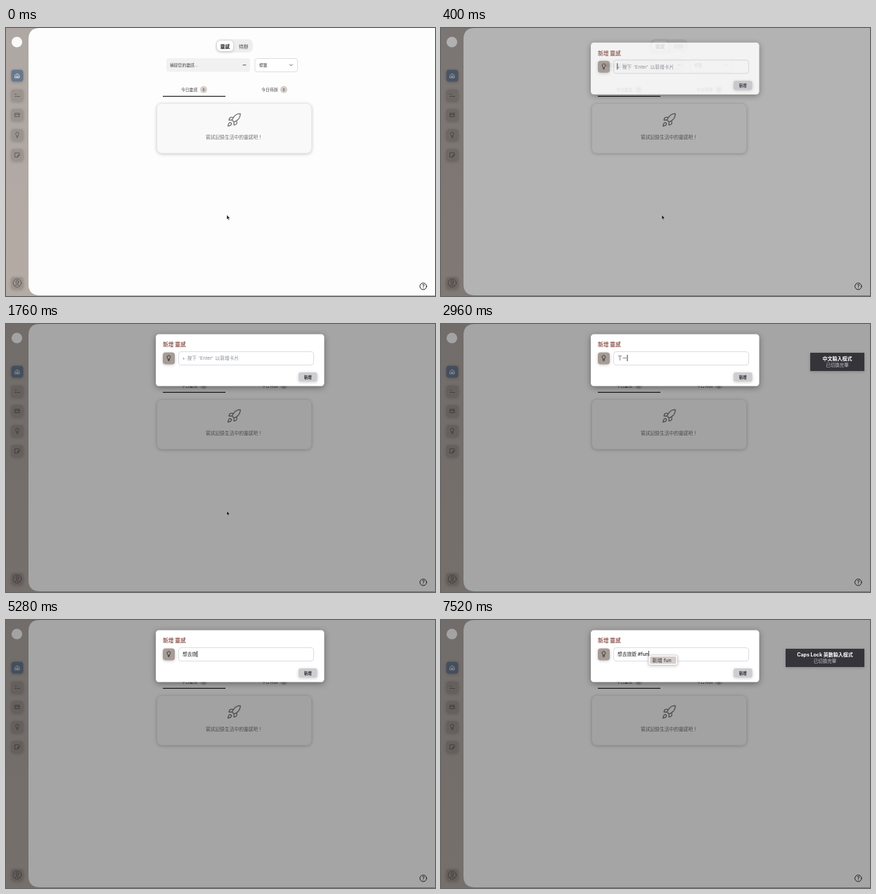
Animation of 610 by 382 pixels, one loop 8 s. Source, as an HTML page:

```html
<!DOCTYPE html>
<html lang="zh-Hant">
<head>
<meta charset="utf-8">
<title>新增靈感</title>
<style>
  html, body { margin: 0; width: 100%; height: 100%; overflow: hidden; background: #b2aaa5; }
  svg { display: block; width: 610px; height: 382px; }
  text { font-family: Inter, "Noto Sans CJK TC", "Noto Sans CJK", sans-serif; white-space: pre; }
  .mid { text-anchor: middle; }
  .line { fill: none; stroke-linecap: round; stroke-linejoin: round; }
  .soft { filter: drop-shadow(0 1px 2px #0003); }
  .deep { filter: drop-shadow(0 2px 4px #0006); }
</style>
</head>
<body>
<svg viewBox="0 0 610 382">
  <defs>
    <linearGradient id="side" x2="0" y2="1">
      <stop stop-color="#aea7a3"/><stop offset="1" stop-color="#b5aba5"/>
    </linearGradient>
  </defs>

  <!-- Sidebar -->
  <rect width="610" height="382" fill="url(#side)"/>
  <circle cx="15.5" cy="20" r="7.6" fill="#fafafa"/>
  <g fill="#9b938e" class="soft">
    <rect x="7.5" y="59.5" width="17" height="17" rx="4" fill="#68788d"/>
    <rect x="7.5" y="87.5" width="17" height="17" rx="4"/>
    <rect x="7.5" y="115.5" width="17" height="17" rx="4"/>
    <rect x="7.5" y="144" width="17" height="17" rx="4"/>
    <rect x="7.5" y="172.5" width="17" height="17" rx="4"/>
    <rect x="7.5" y="355" width="17" height="17" rx="4"/>
  </g>
  <g class="line" stroke="#57504c" stroke-width=".8">
    <path stroke="#eef1f5" d="M13 67.5l3-2.5 3 2.5v3.5h-6zM15 69a1 1 0 0 1 2 0v1h-2z"/>
    <path d="M13 94.5h1.5M13 97.500h1.500M16 97.500h3.500"/>
    <path d="M13 121.500h6v5h-6zM13 123.500h6"/>
    <path d="M15 154.500v-1.500a2.300 2.300 0 1 1 2 0v1.500zM15.200 156.200h1.600"/>
    <path d="M13 178h6v3.500l-2.500 2.500h-3.500zM19 181.500h-2.500v2.500"/>
    <circle cx="16" cy="363.500" r="5.800"/>
    <circle cx="16" cy="362" r="2"/>
    <path d="M12.300 367.500q3.700-4 7.400 0"/>
  </g>

  <!-- Page -->
  <path d="M610 0H48Q32 0 32 16V365Q32 381 48 381H610z" fill="#fdfdfd"/>
  <rect x="298" y="16" width="53" height="19" rx="7" fill="#eee"/>
  <rect x="300" y="18" width="23" height="15" rx="5" fill="#fff" class="soft"/>
  <g font-size="6.7" class="mid">
    <text x="311.500" y="28.500" font-weight="700" fill="#222">靈感</text>
    <text x="337.700" y="28.500" fill="#444">待辦</text>
  </g>
  <rect x="228" y="43" width="119" height="19.500" rx="4" fill="#f1f1f1"/>
  <rect x="354" y="43.500" width="60.500" height="19" rx="3.500" fill="#fff" stroke="#ddd"/>
  <g font-size="5.8" fill="#444">
    <text x="233" y="55">捕捉您的靈感...</text>
    <text x="360" y="55">標籤</text>
    <text x="249" y="90.200" font-weight="500">今日靈感</text>
    <text x="363.300" y="90.200">今日待辦</text>
  </g>
  <path class="line" stroke="#444" stroke-width=".9" d="M337 52.800h4M403.500 52l1.800 1.800 1.800-1.800"/>
  <circle cx="281" cy="87.700" r="5" fill="#d6cdc9"/>
  <circle cx="395" cy="87.700" r="5" fill="#d6cdc9"/>
  <g font-size="5" fill="#333" class="mid">
    <text x="281" y="89.600">0</text><text x="395" y="89.600">0</text>
  </g>
  <rect x="223" y="96.800" width="89" height="1.200" fill="#222"/>
  <rect x="214.500" y="107.500" width="220" height="71" rx="7" fill="#f9f9f9" stroke="#e6e6e6" class="soft"/>
  <path class="line" stroke="#777" stroke-width="1.500" transform="translate(313.400 120.400) scale(.9)"
    d="M4.500 16.500c-1.500 1.260-2 5-2 5s3.740-.5 5-2c.71-.84.7-2.130-.09-2.910a2.180 2.180 0 0 0-2.910-.09zM12 15l-3-3a22 22 0 0 1 2-3.950A12.880 12.880 0 0 1 22 2c0 2.720-.78 7.500-6 11a22.350 22.350 0 0 1-4 2zM9 12H4s.55-3.030 2-4c1.620-1.080 5 0 5 0M12 15v5s3.030-.55 4-2c1.080-1.620 0-5 0-5"/>
  <text x="284" y="157.600" font-size="6.75" font-weight="500" fill="#707070">嘗試記錄生活中的靈感吧！</text>

  <rect id="shade" width="610" height="382" opacity="0"/>

  <circle cx="593.300" cy="368.200" r="4.700" class="line" stroke="#222" stroke-width="1"/>
  <text x="593.300" y="370.800" font-size="7" font-weight="600" fill="#222" class="mid">?</text>

  <!-- Dialog -->
  <g id="dialog" opacity="0">
    <rect x="213" y="14.500" width="239.500" height="74" rx="4.500" fill="#fff" class="deep"/>
    <text x="223" y="32.300" font-size="7.7" font-weight="600" fill="#925f56">新增 靈感</text>
    <rect x="223" y="40.500" width="17" height="17" rx="4" fill="#a69b95" class="soft"/>
    <path class="line" stroke="#222" stroke-width=".9" d="M230.400 50.500v-1.300a2.300 2.300 0 1 1 2 0v1.300zM230.600 52.200h1.600"/>
    <rect x="245.500" y="39.500" width="192" height="19" rx="3.500" fill="#fff" stroke="#dcdde3"/>
    <text id="hint" x="250.500" y="51.400" font-size="6.75" fill="#868b96" word-spacing=".9">+ 按下 'Enter' 以新增卡片</text>
    <text id="typed" x="251" y="51.400" font-size="6.75" font-weight="500" fill="#222"></text>
    <rect id="caret" y="44" width=".9" height="9" fill="#222"/>
    <rect x="416" y="69" width="26.500" height="13" rx="3" fill="#cdcdd2" class="soft"/>
    <text x="429.300" y="77.600" font-size="5.5" font-weight="600" fill="#222" class="mid">新增</text>
  </g>

  <!-- Tag suggestion -->
  <g id="popup">
    <rect id="frame" y="50" height="14.500" rx="3" fill="#fff" stroke="#bbb" stroke-width=".6" class="soft"/>
    <rect id="choice" y="52" height="10.500" rx="2" fill="#d5cecb"/>
    <text id="tag" y="60" font-size="7.2" fill="#333"></text>
  </g>

  <!-- Input mode notice -->
  <g id="notice" fill="#fff" class="mid">
    <rect id="plate" y="41" height="26" fill="#36343b" class="soft"/>
    <text id="mode" y="51.900" font-size="7" font-weight="700"></text>
    <text id="note" y="60.500" font-size="6.5" fill="#c4c3c8">已切換完畢</text>
  </g>

  <path id="mouse" d="M314 266.500v6.400l1.500-1.300 1 2.300 1-.4-1-2.200h2z" fill="#111" stroke="#fff" stroke-width=".4"/>
</svg>
<script>
const LOOP = 8000, STEP = 80;
const el = id => document.getElementById(id);
const set = (id, attrs) => { for (const k in attrs) el(id).setAttribute(k, attrs[k]); };
const show = (id, on) => { el(id).style.display = on ? '' : 'none'; };

// Start time and field content; a trailing "|" is the lit caret.
const typing = [
  [0, '|'], [720, ''], [1200, '|'], [1760, ''], [2240, '|'],
  [2640, 'ㄒ|'], [2960, 'ㄒㄧ|'], [3040, 'ㄒㄧㄤ|'], [3200, '想|'],
  [3440, '想ㄑ|'], [3600, '想ㄑㄩ|'], [3680, '想去|'], [4320, '想去'], [4880, '想去|'],
  [5040, '想去ㄌ|'], [5120, '想去ㄌㄩ|'], [5280, '想去旅|'], [5360, '想去旅ㄧ|'],
  [5600, '想去旅ㄧㄡ|'], [5680, '想去旅遊|'], [6320, '想去旅遊 |'], [6800, '想去旅遊 '],
  [6960, '想去旅遊 #|'], [7360, '想去旅遊 #f|'], [7440, '想去旅遊 #fu|'], [7520, '想去旅遊 #fun|']
];

function drawField(t) {
  const state = typing.findLast(([start]) => t >= start)[1];
  const text = state.replace('|', '');
  el('typed').textContent = text;
  show('hint', !text);
  const end = 251 + (text ? el('typed').getComputedTextLength() : -0.7);
  set('caret', { x: end });
  show('caret', state.endsWith('|'));

  const tag = text.split('#')[1];
  show('popup', tag);
  if (!tag) return;
  el('tag').textContent = '新增 ' + tag;
  const width = el('tag').getComputedTextLength();
  set('frame', { x: end + 0.2, width: width + 14 });
  set('choice', { x: end + 2.2, width: width + 10 });
  set('tag', { x: end + 5.5 });
}

function drawNotice(t) {
  const caps = t >= 6560;
  show('notice', caps || (t >= 2480 && t < 3920));
  const left = caps ? 490 : 525, mid = (left + 602) / 2;
  el('mode').textContent = caps ? 'Caps Lock 英數輸入模式' : '中文輸入模式';
  set('plate', { x: left, width: 602 - left });
  set('mode', { x: mid });
  set('note', { x: mid });
}

function draw(now) {
  const t = Math.floor(now % LOOP / STEP) * STEP;
  const open = t < 320 ? 0 : t > 880 ? 1 : 1 - Math.exp((257 - t) / 77);
  set('shade', { opacity: 0.35 * open });
  set('dialog', { opacity: open, transform: `translate(0 ${40 * (1 - open)})` });
  drawField(t);
  drawNotice(t);
  show('mouse', t < 2480);
  requestAnimationFrame(draw);
}
draw(performance.now());
</script>
</body>
</html>
```
